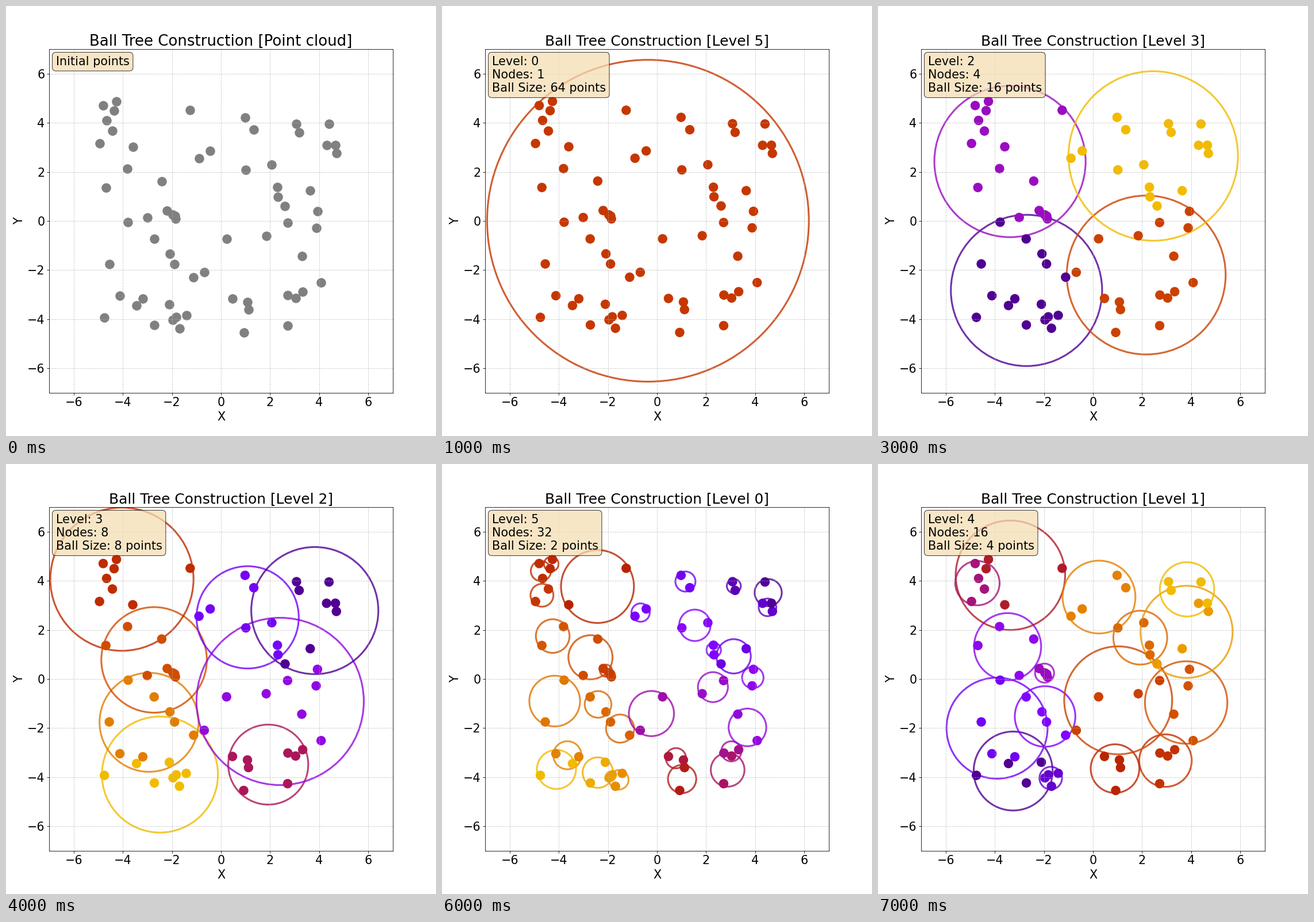
Animation, 748 px wide and 748 px high, one loop 8 s. Source, as a matplotlib script:

```python
import numpy as np
import matplotlib.pyplot as plt
from matplotlib.animation import FuncAnimation
from matplotlib.patches import Circle

plt.rcParams["font.family"] = "DejaVu Sans"

FONT = 20
MARGIN = 0.1
DEPTH = 5
# Tree level shown at each step; None is the bare point cloud
STEPS = [None, 0, 1, 2, 3, 4, 5, 4]

np.random.seed(42)
points = np.random.rand(64, 2) * 10 - 5


def split(ball):
    """Halve a ball at the median of its widest dimension."""
    dim = np.argmax(np.ptp(ball, axis=0))
    ball = ball[np.argsort(ball[:, dim])]
    mid = len(ball) // 2
    return [ball[:mid], ball[mid:]]


levels = [[points]]
for _ in range(DEPTH):
    levels.append([half for ball in levels[-1] for half in split(ball)])


def palette(level):
    count = len(levels[level])
    shades = np.linspace(0.1, 0.9, count) if count > 1 else np.array([0.6])
    # The colour order flips on every other level
    if level % 2:
        shades = shades[::-1]
    return plt.cm.gnuplot(shades)


fig = plt.figure(figsize=(10, 10), dpi=74.8, facecolor="white")
ax = fig.add_axes([0.1, 0.1, 0.8, 0.8])


def draw_axes(title, size, note):
    ax.set(xlim=(-7, 7), ylim=(-7, 7))
    ax.set_xticks(range(-6, 7, 2))
    ax.set_yticks(range(-6, 7, 2))
    ax.tick_params(labelsize=FONT)
    ax.set_xlabel("X", fontsize=FONT)
    ax.set_ylabel("Y", fontsize=FONT)
    ax.grid(True, linestyle="--", alpha=0.7)
    ax.set_title(f"Ball Tree Construction [{title}]", fontsize=size)
    ax.text(0.02, 0.98, note, transform=ax.transAxes, fontsize=FONT, va="top",
            bbox=dict(boxstyle="round", facecolor="wheat", alpha=0.75))


def draw_balls(level):
    balls = levels[level]
    colors = palette(level)
    for ball, color in zip(balls, colors):
        center = ball.mean(axis=0)
        radius = np.linalg.norm(ball - center, axis=1).max() + MARGIN
        ax.add_patch(Circle(center, radius, fill=False, edgecolor=color,
                            linewidth=3, alpha=0.8))
    size = len(balls[0])
    ax.scatter(*np.vstack(balls).T, s=220, c=np.repeat(colors, size, axis=0))
    return f"Level: {level}\nNodes: {len(balls)}\nBall Size: {size} points"


def update(step):
    ax.clear()
    level = STEPS[step]
    if level is None:
        ax.scatter(*points.T, s=220, c="gray")
        draw_axes("Point cloud", 25, "Initial points")
    else:
        draw_axes(f"Level {DEPTH - level}", 24, draw_balls(level))
    return []


anim = FuncAnimation(fig, update, frames=len(STEPS), init_func=lambda: [],
                     interval=1000, repeat=True)
plt.show()
```
